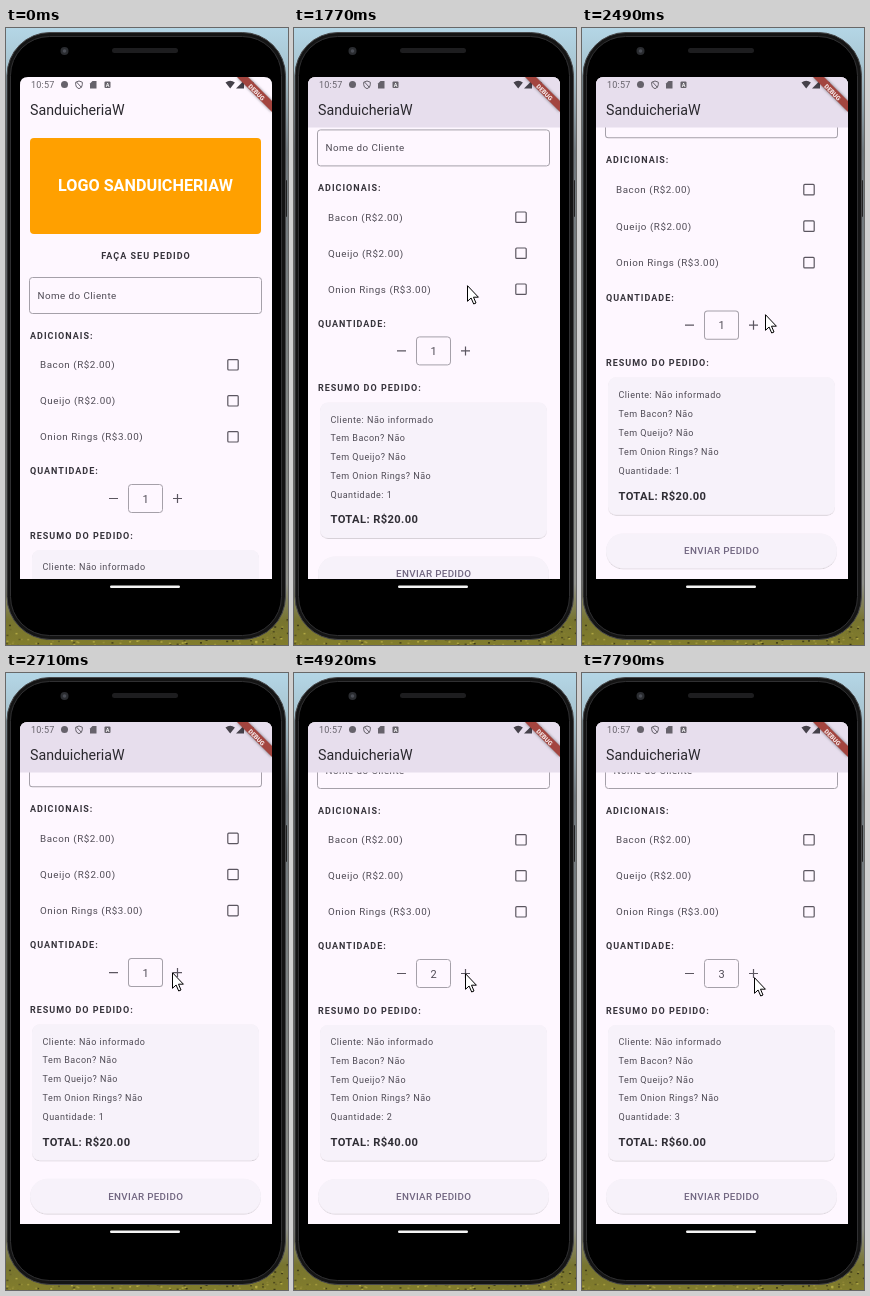
Write an HTML page that moves like this. It is 282x617 px and loops after 8000 ms.

```html
<!DOCTYPE html>
<html lang="pt-BR">
<head>
<meta charset="utf-8">
<title>SanduicheriaW</title>
<style>
html, body { margin: 0; width: 100%; height: 100%; overflow: hidden; background: #000; }
svg { display: block; width: 282px; height: 617px; }
text { font-family: Roboto, sans-serif; fill: #4f4b55; }
.mid { text-anchor: middle; }
.head { font-size: 9px; font-weight: 700; letter-spacing: 1px; fill: #36333b; }
.row { font-size: 9.8px; letter-spacing: .55px; }
.sum { font-size: 9px; letter-spacing: .49px; }
.total { font-size: 11.2px; font-weight: 700; letter-spacing: .4px; fill: #2f2d34; }
.line { fill: none; stroke: #5b5660; stroke-width: 1.2; }
.field { fill: none; stroke: #a5a0a9; }
.badge { font-size: 6.3px; font-weight: 900; fill: #f3e6e6; }
</style>
</head>
<body>
<svg viewBox="0 0 282 617">
  <defs>
    <linearGradient id="land" x2="0" y2="1">
      <stop offset="0" stop-color="#b4d6e6"/>
      <stop offset=".06" stop-color="#a9c6d2"/>
      <stop offset=".2" stop-color="#6f777c"/>
      <stop offset=".9" stop-color="#8f918c"/>
      <stop offset=".96" stop-color="#77742f"/>
      <stop offset="1" stop-color="#827d2c"/>
    </linearGradient>
    <clipPath id="screen"><path d="M14 551V57q0-8 8-8h236q8 0 8 8v494z"/></clipPath>
    <clipPath id="view"><rect x="14" y="99" width="252" height="452"/></clipPath>
    <filter id="shade" x="-5%" y="-10%" width="110%" height="125%">
      <feDropShadow dx="0" dy=".7" stdDeviation=".7" flood-opacity=".22"/>
    </filter>
  </defs>

  <rect width="282" height="617" fill="url(#land)"/>
  <g id="grass"></g>

  <!-- phone -->
  <rect x="277" y="152" width="4" height="37" rx="1" fill="#222"/>
  <rect x="1" y="4.500" width="278.500" height="607" rx="43" fill="#141414" stroke="#48484a"/>
  <rect x="4.500" y="8.500" width="271" height="599" rx="39" fill="#000" stroke="#303032"/>
  <circle cx="58.500" cy="23" r="4" fill="#2a2c30"/>
  <circle cx="58.500" cy="23" r="1.800" fill="#4a4d55"/>
  <rect x="106" y="20" width="66" height="5" rx="2.500" fill="#1d1d1f"/>
  <rect x="104" y="557.500" width="70" height="2.600" rx="1.300" fill="#f4f4f4"/>

  <g clip-path="url(#screen)">
    <rect x="14" y="49" width="252" height="503" fill="#fef7ff"/>

    <g clip-path="url(#view)"><g id="page">
      <rect x="24" y="110" width="231" height="96" rx="4" fill="#ffa000"/>
      <text class="mid" x="139.500" y="163" style="font-size:16.200px;font-weight:700;fill:#fff">LOGO SANDUICHERIAW</text>
      <text class="head mid" x="140" y="231">FAÇA SEU PEDIDO</text>
      <rect class="field" x="23.500" y="249.500" width="232" height="36" rx="3"/>
      <text class="row" x="31.500" y="271" style="letter-spacing:.45px">Nome do Cliente</text>
      <text class="head" x="24" y="310.500">ADICIONAIS:</text>
      <g id="extras"></g>
      <text class="head" x="24" y="446.400">QUANTIDADE:</text>
      <path class="line" d="M103 470.500h9M167 470.500h9M171.500 466v9"/>
      <rect class="field" x="122.500" y="456.500" width="34" height="28" rx="3"/>
      <text class="mid" id="count" x="139.500" y="474.500" style="font-size:11px"></text>
      <text class="head" x="24" y="510.500">RESUMO DO PEDIDO:</text>
      <rect x="26" y="522" width="227" height="135.500" rx="8" fill="#f7f2fa" filter="url(#shade)"/>
      <g id="summary"></g>
      <text class="total" id="total" x="36.500" y="643"></text>
      <rect x="24" y="676" width="231" height="34.500" rx="17.250" fill="#f7f2fa" filter="url(#shade)"/>
      <text class="row mid" x="139.700" y="696.800" style="font-weight:500;letter-spacing:.33px;fill:#716680">ENVIAR PEDIDO</text>
    </g></g>

    <!-- app bar -->
    <rect id="bar" x="14" y="49" width="252" height="50.500" fill="#e7deed"/>
    <text x="24" y="86.500" style="font-size:14.200px;fill:#2a282e">SanduicheriaW</text>
    <g fill="#66626b">
      <text x="25" y="60" style="font-size:9px;fill:#66626b;letter-spacing:.2px">10:57</text>
      <circle cx="58.500" cy="56.500" r="3.500"/>
      <path d="M73 53l3.300 1.200v2.500q0 2.800-3.300 4-3.300-1.200-3.300-4v-2.500zM70.500 54l5 5.500" fill="none" stroke="#66626b"/>
      <path d="M86.500 53h4v7.500h-6.500v-5z"/>
      <rect x="98.500" y="53.500" width="6" height="6.500" rx="1"/>
      <path d="M219.500 54.500q4.700-3.500 9.400 0l-4.700 6z" fill="#45414a"/>
      <path d="M238 52.500v8h-8z" fill="#45414a"/>
      <path d="M243 54h1.200v-1h2v1h1.300v6.500h-4.500z" fill="#45414a"/>
    </g>
    <text class="mid" x="101.500" y="59" style="font-size:5.500px;font-weight:700;fill:#fff">A</text>
    <path d="M231 49h11l24 24v11z" fill="#a3453f" style="filter:drop-shadow(0 0 1.500px #0008)"/>
    <text class="badge mid" transform="translate(250 64.800) rotate(45)" y="1.500">DEBUG</text>
  </g>

  <circle id="touch" r="12" opacity=".06"/>
  <path id="cursor" d="M.5.7v15.600l3.600-3.300 2.600 6 2.300-1-2.500-5.800h4.900z" fill="#fff" stroke="#000"/>
</svg>
<script>
const $ = id => document.getElementById(id);
const LOOP = 8000, TICK = 71.5, BOTTOM = 551;

// eased progress from 0 to 1 between two moments
const ease = (t, from, to) => 1 - (1 - Math.min(1, Math.max(0, (t - from) / (to - from)))) ** 2;
const within = (t, from, to) => t >= from && t < to;

const scroll = t => 98.6 * ease(t, 1130, 1350) + 71.4 * ease(t, 1640, 1930);
const stretch = t => .0133 * (ease(t, 1900, 2350) - ease(t, 2500, 2920));
const amount = t => 1 + (t >= 4920) + (t >= 6700);
const pressed = t => within(t, 3220, 3350) || within(t, 6550, 6840);

// pointer glides: from ms, to ms, x, y
const START = [315, 772];
const glides = [[200, 550, 173, 257], [2340, 2480, 183, 286], [2500, 2790, 164, 301],
  [3770, 3910, 166, 301], [4130, 4410, 171, 300], [7640, 7780, 172, 304]];
const pointer = t => glides.reduce(([px, py], [from, to, x, y]) => {
  const k = ease(t, from, to);
  return [px + (x - px) * k, py + (y - py) * k];
}, START);

let seed = 7;
const random = () => (seed = seed * 16807 % 2147483647) / 2147483647;
for (let i = 0; i < 260; i++) {
  const x = 282 * random(), y = 590 + 27 * random(), light = 15 + 35 * random();
  $('grass').innerHTML += `<rect x="${x}" y="${y}" width="2" height="1.500" fill="hsl(55 45% ${light}%)"/>`;
}

$('extras').innerHTML = ['Bacon (R$2.00)', 'Queijo (R$2.00)', 'Onion Rings (R$3.00)'].map((label, i) => {
  const y = 337 + 36 * i;
  return `<text class="row" x="34" y="${y + 3.2}">${label}</text>
    <rect class="line" x="221.8" y="${y - 5.4}" width="10.4" height="10.4" rx="1"/>`;
}).join('');

function showOrder(n) {
  const lines = ['Cliente: Não informado', 'Tem Bacon? Não', 'Tem Queijo? Não', 'Tem Onion Rings? Não', 'Quantidade: ' + n];
  $('summary').innerHTML = lines.map((line, i) =>
    `<text class="sum" x="36.5" y="${542.3 + 18.7 * i}">${line}</text>`).join('');
  $('count').textContent = n;
  $('total').textContent = `TOTAL: R$${20 * n}.00`;
}

let shown = 0;
function draw(now) {
  const t = now % LOOP;
  const step = Math.floor((t + 20) / TICK) * TICK - 20; // motion is sampled at 14 steps a second
  const offset = scroll(step), n = amount(t);
  const place = `translate(${pointer(step).map(Math.round)})`;
  if (n !== shown) showOrder(shown = n);
  // overscroll stretches the page upwards from the bottom edge
  $('page').setAttribute('transform',
    `translate(0 ${BOTTOM}) scale(1 ${1 + stretch(step)}) translate(0 ${-BOTTOM - offset})`);
  $('bar').setAttribute('visibility', offset ? 'visible' : 'hidden');
  $('cursor').setAttribute('transform', place);
  $('touch').setAttribute('transform', place);
  $('touch').setAttribute('visibility', pressed(t) ? 'visible' : 'hidden');
  requestAnimationFrame(draw);
}
draw(0);
</script>
</body>
</html>
```
